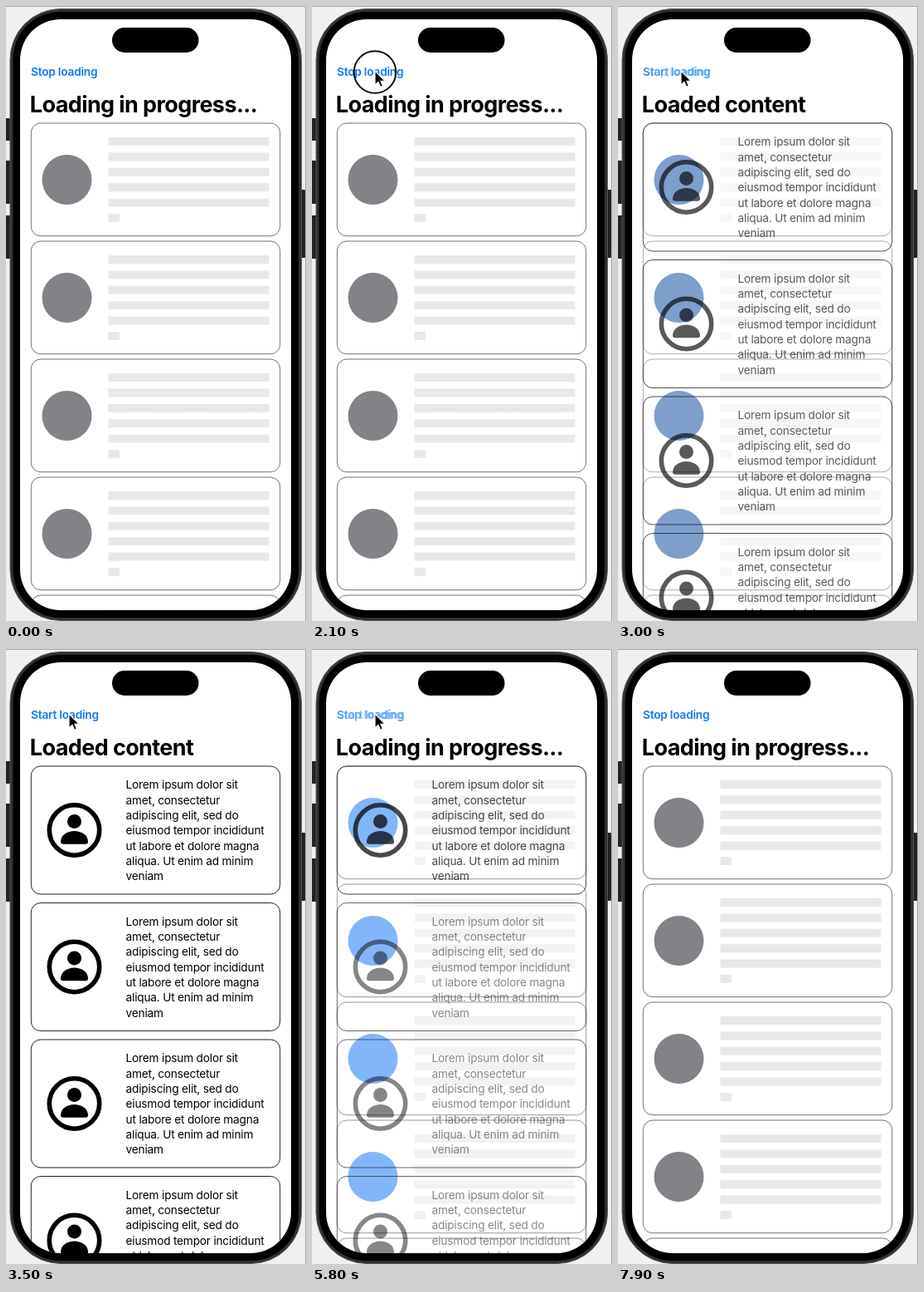
An HTML page for the animation above (8.4 s loop, 362 by 740 pixels).

```html
<!DOCTYPE html>
<html lang="en">
<head>
<meta charset="utf-8">
<title>Skeleton loading</title>
<style>
  html, body { margin: 0; width: 100%; height: 100%; overflow: hidden; background: #f0f0f0; }
  svg { display: block; width: 362px; height: 740px; }
  text { font-family: Inter, "Liberation Sans", sans-serif; font-size: 13.7px; letter-spacing: -.21px; white-space: pre; }
  .title { font-size: 27px; font-weight: 700; letter-spacing: -.6px; }
  .button { font-weight: 600; fill: #087bf5; }
  .outline { fill: none; stroke: #222; }
  .skeleton .outline { stroke: #727276; }
</style>
</head>
<body>
<svg viewBox="0 0 362 740">
  <defs>
    <linearGradient id="shine" gradientUnits="userSpaceOnUse" x1="0" y1="0" x2="70" y2="25">
      <stop offset="0" stop-color="#e8e8e8"/>
      <stop offset=".5" stop-color="#f5f5f5"/>
      <stop offset="1" stop-color="#e8e8e8"/>
    </linearGradient>
    <clipPath id="screen"><rect x="17" y="16" width="327" height="711" rx="49"/></clipPath>
  </defs>

  <path d="M0 .5H361.5V740" fill="none" stroke="#a5a5a5"/>
  <g fill="#222">
    <rect x="-2" y="135" width="8" height="27" rx="1"/>
    <rect x="-2" y="186" width="8" height="52" rx="1"/>
    <rect x="-2" y="252" width="8" height="52" rx="1"/>
    <rect x="354" y="221" width="7" height="82" rx="1"/>
  </g>
  <rect x="5" y="3.5" width="351.5" height="736" rx="61" fill="#303030" stroke="#555"/>
  <rect x="8.5" y="7" width="344.5" height="729" rx="57"/>
  <rect x="17" y="16" width="327" height="711" rx="49" fill="#fff"/>

  <g clip-path="url(#screen)">
    <g id="cards"></g>
    <text class="button" id="stop" x="30" y="84.3">Stop loading</text>
    <text class="button" id="start" x="30" y="84.3">Start loading</text>
    <text class="title" id="title" x="28.8" y="128"></text>
  </g>
  <rect x="128" y="26" width="104.5" height="30" rx="15"/>

  <circle id="ring" cx="76" cy="79.5" r="25.3" fill="none" stroke="#111" stroke-width="2"/>
  <path id="cursor" d="M0 0V17L4 13.4 6.6 19.4 9.4 18.2 6.9 12.3H12.2Z" stroke="#fff" stroke-width="1.2"/>
</svg>

<script>
const LOOP = 8400;
const $ = id => document.getElementById(id);
const all = sel => [...document.querySelectorAll(sel)];
const range = n => [...Array(n).keys()];
const clamp = x => Math.min(1, Math.max(0, x));
const span = (t, from, to) => clamp((t - from) / (to - from));
const smooth = x => x * x * (3 - 2 * x);
const mix = (a, b, k) => a + (b - a) * k;

const GREY = [130, 130, 135], DEEP_BLUE = [38, 91, 169], LIGHT_BLUE = [84, 155, 248];
const LINES = ['Lorem ipsum dolor sit', 'amet, consectetur', 'adipiscing elit, sed do',
  'eiusmod tempor incididunt', 'ut labore et dolore magna', 'aliqua. Ut enim ad minim', 'veniam'];

const outline = height =>
  `<rect class="outline" x="30.3" y="141" width="300.4" height="${height}" rx="11.5"/>`;

const skeleton = i => `<g class="skeleton" transform="translate(0 ${142 * i})">
  ${outline(135.7)}
  <circle class="avatar" cx="73.5" cy="209" r="30"/>
  <g class="bars" fill="url(#shine)">${range(6).map(n =>
    `<rect x="123.5" y="${158 + 18.4 * n}" width="${n < 5 ? 194 : 13.5}" height="10"/>`).join('')}</g>
</g>`;

const content = i => `<g class="content" transform="translate(0 ${164.5 * i})">
  ${outline(154)}
  <g class="body">
    <circle cx="82.5" cy="218" r="30.2" fill="none" stroke="#000" stroke-width="5.6"/>
    <circle cx="82.5" cy="207.6" r="8.5"/>
    <path d="M66 232C66 224 74 219 82.5 219S99 224 99 232Q99 234.7 96 234.7H69Q66 234.7 66 232Z"/>
    ${LINES.map((line, n) => `<text x="144.6" y="${168.2 + 18.35 * n}">${line}</text>`).join('')}
  </g>
</g>`;

$('cards').innerHTML = range(5).map(skeleton).join('') + range(4).map(content).join('');

const setOpacity = (sel, value) => all(sel).forEach((el, i) =>
  el.setAttribute('opacity', typeof value === 'function' ? value(i) : value));

function drawCards(t) {
  const leaving = t < 5000;
  const x = leaving ? span(t, 2250, 3500) : span(t, 5150, 6400);
  const p = smooth(x);
  const shown = leaving ? p : 1 - p;
  // The first card lingers a little when the content goes away.
  const cardShown = i => leaving || i ? shown : 1 - smooth(x ** 1.6);

  setOpacity('.skeleton .outline, .avatar', Math.sqrt(1 - shown));
  setOpacity('.bars', 1 - shown);
  setOpacity('.content .outline', i => Math.sqrt(cardShown(i)));
  setOpacity('.body', cardShown);
  setOpacity('#start', shown);
  setOpacity('#stop', 1 - shown);

  const tint = leaving ? clamp(p * 2) : clamp((1 - p) / .4);
  const blue = leaving ? DEEP_BLUE : LIGHT_BLUE;
  const fill = `rgb(${GREY.map((c, i) => Math.round(mix(c, blue[i], tint)))})`;
  all('.avatar').forEach(el => el.setAttribute('fill', fill));

  $('title').textContent = t >= 2300 && t < 5200 ? 'Loaded content' : 'Loading in progress...';
}

function drawShine(t) {
  const sweep = t < 5000 ? span(t, 700, 1750) : span(t, 7000, 7950);
  $('shine').setAttribute('gradientTransform', `translate(${mix(-40, 420, sweep)} 0)`);
}

function drawPointer(t) {
  const enter = smooth(span(t, 700, 1700)), leave = smooth(span(t, 7000, 7700));
  const x = mix(mix(-16, 76, enter), -18, leave);
  const y = mix(mix(16, 78, enter), 112, leave);
  $('cursor').setAttribute('transform', `translate(${x} ${y})`);
  const pressed = t >= 2000 && t < 2300 || t >= 5000 && t < 5200;
  setOpacity('#ring', !pressed ? 0 : t < 2100 ? .5 : 1);
}

function draw() {
  // The picture advances ten times a second.
  const t = Math.floor(performance.now() % LOOP / 100) * 100;
  drawCards(t);
  drawShine(t);
  drawPointer(t);
  requestAnimationFrame(draw);
}
draw();
</script>
</body>
</html>
```
